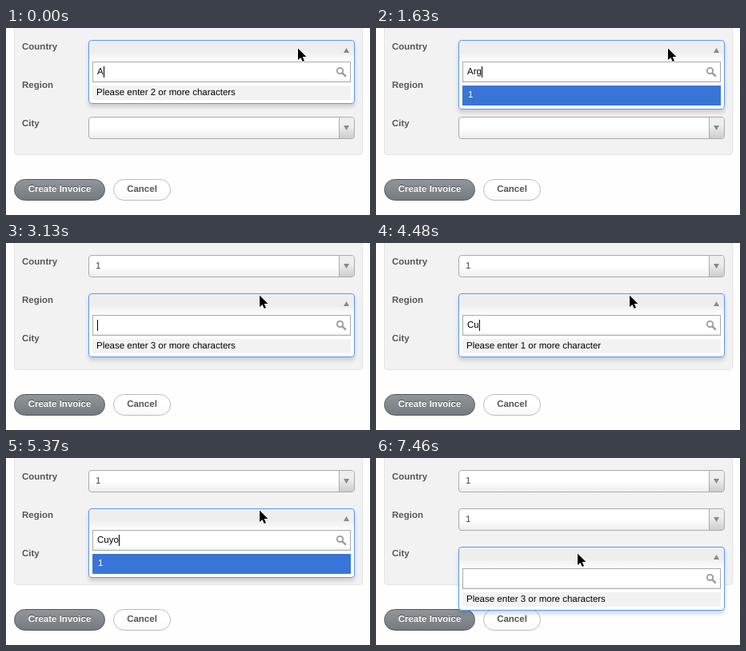
An HTML page that plays this animation: 455x234 px, repeating every 8 s.

```html
<!DOCTYPE html>
<html lang="en">
<head>
<meta charset="utf-8">
<title>Dependent selects</title>
<style>
  html, body { margin: 0; width: 455px; height: 234px; overflow: hidden; background: #fefefe; }
  body { position: relative; font: 11.5px/14px "Liberation Sans", Arial, sans-serif; text-rendering: geometricPrecision; color: #444; }
  div, svg { position: absolute; box-sizing: border-box; white-space: pre; }
  .panel { left: 10px; top: -10px; width: 436px; height: 169px; background: #f2f2f2; border: 1px solid #e4e4e4; border-radius: 4px; }
  .label { left: 20px; font-weight: bold; color: #555; text-shadow: 0 1px #fff; }
  .select { left: 103px; width: 333px; height: 28px; border: 1px solid #aaa; border-radius: 4px; overflow: hidden;
    background: linear-gradient(to top, #eee, #fff 50%); }
  .select.focus { border-color: #5897fb; box-shadow: 0 0 4px rgba(60, 110, 200, .45); }
  .value { left: 8px; top: 6px; }
  .toggle { right: 0; top: 0; width: 19px; height: 26px; border-left: 1px solid #aaa; background: linear-gradient(to top, #ccc, #eee 60%); }
  .tri { width: 7px; height: 6px; background: #888; }
  .toggle .tri { left: 5px; top: 10px; clip-path: polygon(0 0, 100% 0, 50% 100%); }
  .drop { left: 103px; width: 333px; border: 1px solid #5897fb; border-radius: 4px; box-shadow: 0 4px 5px rgba(0, 0, 0, .15);
    background: linear-gradient(#eee 14px, #fff 27px); }
  .drop > .tri { left: 318px; top: 9px; clip-path: polygon(50% 0, 100% 100%, 0 100%); }
  .search { left: 4px; top: 26px; width: 323px; height: 26px; border: 1px solid #aaa; background: linear-gradient(#fff 85%, #eee 99%); color: #000; }
  .query { left: 5px; top: 5px; height: 14px; }
  .caret { display: inline-block; width: 1px; height: 14px; background: #000; vertical-align: top; }
  .row { left: 4px; top: 56px; width: 323px; }
  .note { height: 18px; padding: 2px 5px; background: #f2f2f2; color: #000; }
  .hit, .idle { height: 25px; padding: 5px 7px; }
  .hit { background: #3875d7; color: #fff; }
  .button { top: 189px; height: 27px; border: 1px solid #bbb; border-radius: 14px; font-weight: bold; line-height: 25px; text-align: center; }
  .create { left: 10px; width: 114px; color: #fff; border-color: #54595d; background: linear-gradient(#90969a, #747a7f); text-shadow: 0 -1px #44494d; }
  .cancel { left: 134px; width: 72px; color: #555; background: linear-gradient(#fff 50%, #f8f8f8); }
</style>
</head>
<body>
<div class="panel"></div>
<div class="button create">Create Invoice</div>
<div class="button cancel">Cancel</div>
<div class="drop">
  <div class="tri"></div>
  <div class="search">
    <div class="query"><span></span><i class="caret"></i></div>
    <svg style="left:303px;top:5px" width="15" height="15" fill="none" stroke="#999">
      <circle cx="5.5" cy="5.5" r="3.7" stroke-width="1.8"/><path d="M8.4 8.4l4.4 4.2" stroke-width="2.4"/>
    </svg>
  </div>
  <div class="row"></div>
</div>
<svg class="pointer" width="20" height="21">
  <path id="arrow" d="M1 .5V15l3.4-3.1 2.3 5.2 2.3-1-2.3-5H11.4z" stroke="#fff" paint-order="stroke" stroke-width="1.6"/>
  <g id="hand" fill="#fff" stroke="#000" stroke-linejoin="round">
    <path d="M4.8 10.5V2a1.4 1.4 0 0 1 2.8 0v5q2-1 2.6.5 2-.8 2.6.6 2.2-.5 2.5 1.2v3q0 1.5-1 3v2H6.5v-1.5Q4 13 1.6 10 .6 8.6 1.8 8q1.4-.3 3 2.5z"/>
    <path d="M8 11.5v3m2.2-3v3m2.2-3v3" stroke-width=".9"/>
  </g>
</svg>
<script>
const LOOP = 8000;
const $ = s => document.querySelector(s);
const top0 = i => 15 + 48 * i;

const selects = ['Country', 'Region', 'City'].map((name, i) => {
  $('.drop').insertAdjacentHTML('beforebegin',
    `<div class="label" style="top:${top0(i) + 2}px">${name}</div>
     <div class="select" style="top:${top0(i)}px"><div class="value"></div>
     <div class="toggle"><div class="tri"></div></div></div>`);
  return $('.drop').previousElementSibling;
});

const note = text => ({ kind: 'note', text });
const need = n => note(`Please enter ${n} or more character${n > 1 ? 's' : ''}`);
const found = kind => ({ kind, text: '1' });
const arrow = (x, y) => ({ shape: 'arrow', x, y });
const hand = (x, y) => ({ shape: 'hand', x, y });

// Each step overrides part of the state from its time on.
const steps = [
  [0, { open: 0, focus: -1, filled: 0, query: 'A', caret: true, row: need(2), pointer: arrow(364, 25) }],
  [140, { query: 'Ar', row: need(1) }],
  [440, { query: 'Arg', row: note('Searching...') }],
  [590, { row: found('hit') }],
  [1030, { caret: false }],
  [1630, { caret: true }],
  [1930, { open: -1, focus: 0, filled: 1 }],
  [2680, { pointer: arrow(330, 53) }],
  [2830, { pointer: arrow(321, 60) }],
  [2980, { pointer: hand(312, 66) }],
  [3130, { open: 1, focus: -1, query: '', row: need(3), pointer: arrow(316, 65) }],
  [3730, { caret: false }],
  [4180, { caret: true, query: 'C', row: need(2) }],
  [4480, { query: 'Cu', row: need(1) }],
  [4920, { query: 'Cuy', row: note('Searching...') }],
  [5070, { row: found('hit') }],
  [5220, { query: 'Cuyo', row: found('idle') }],
  [5370, { row: found('hit') }],
  [5820, { open: -1, focus: 1, filled: 2 }],
  [6720, { pointer: hand(246, 120) }],
  [7020, { open: 2, focus: -1, query: '', row: need(3), pointer: arrow(251, 119) }],
  [7460, { caret: false }],
];

function draw(t) {
  const s = Object.assign({}, ...steps.filter(([at]) => at <= t).map(step => step[1]));
  selects.forEach((el, i) => {
    el.classList.toggle('focus', i === s.focus);
    el.style.visibility = i === s.open ? 'hidden' : 'visible';
    el.firstChild.textContent = i < s.filled ? '1' : '';
  });

  const drop = $('.drop').style;
  drop.display = s.open < 0 ? 'none' : 'block';
  drop.top = top0(s.open) + 'px';
  drop.height = (s.row.kind === 'note' ? 80 : 87) + 'px';
  $('.query span').textContent = s.query;
  $('.caret').style.visibility = s.caret ? 'inherit' : 'hidden';
  $('.row').className = 'row ' + s.row.kind;
  $('.row').textContent = s.row.text;

  const { shape, x, y } = s.pointer;
  $('.pointer').style.cssText = `left:${x}px;top:${y}px`;
  for (const id of ['arrow', 'hand']) $('#' + id).style.display = id === shape ? 'inline' : 'none';
}

function tick() {
  draw(performance.now() % LOOP);
  requestAnimationFrame(tick);
}
tick();
</script>
</body>
</html>
```
